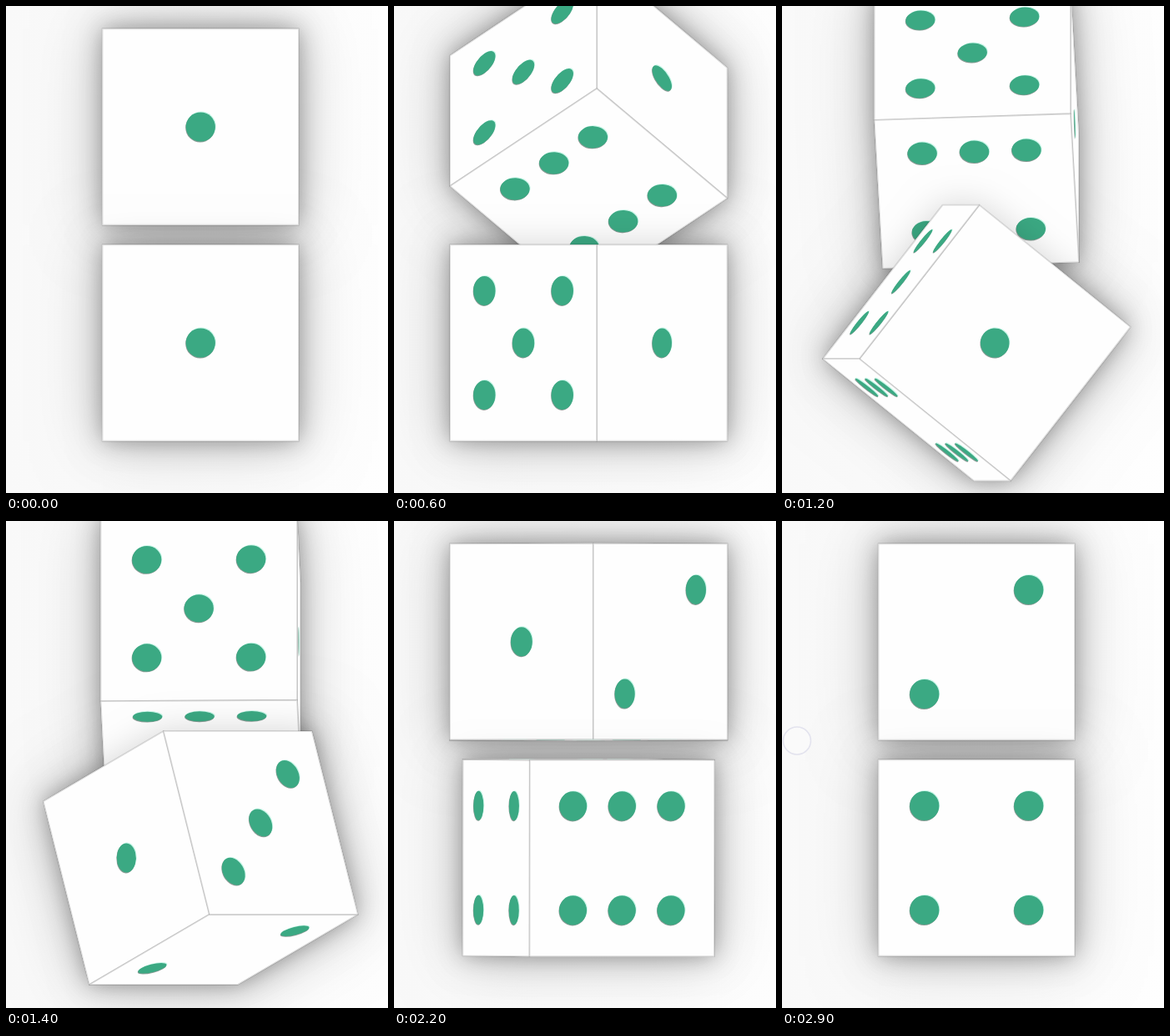
Recreate the animation shown at these times as an HTML page with a canvas. Size 458 by 584 pixels, loop 3 s.

```html
<!DOCTYPE html>
<html lang="en">
<head>
<meta charset="utf-8">
<title>Rolling dice</title>
<style>
  html, body { margin: 0; width: 100%; height: 100%; overflow: hidden; background: #fcfcfc; }
  canvas { display: block; width: 458px; height: 584px; }
</style>
</head>
<body>
<canvas id="stage" width="458" height="584"></canvas>
<script>
const ctx = document.getElementById('stage').getContext('2d');
const W = 458, H = 584, LOOP = 3000, STEP = 100;
const HALF = 117.75, PIP_GAP = 62.5, PIP_RADIUS = 17.6;
const ROLL_TIME = 960;

// A roll takes over after `cut`; its easing clock runs from `begin`.
const ROLLS = [
  { cut: 0, begin: 300 },
  { cut: 1000, begin: 952 },
  { cut: 1800, begin: 1775 }
];

// Target rotations [x, y, z] in degrees, one per roll.
const DICE = [
  { x: 233.3, y: 145, targets: [[90, 90, 0], [0, 90, 0], [0, -90, 0]] },
  { x: 233.3, y: 404, targets: [[0, 90, 0], [0, -90, 90], [0, 180, 90]] }
];

const X = [1, 0, 0], Y = [0, 1, 0], Z = [0, 0, 1];
const CENTRE = [[0, 0]];
const DIAGONAL = [[-1, -1], [1, 1]];
const CORNERS = [...DIAGONAL, [1, -1], [-1, 1]];
const neg = v => v.map(c => -c);

const FACES = [
  { n: Z, u: X, v: Y, pips: CENTRE },
  { n: X, u: Z, v: Y, pips: DIAGONAL },
  { n: neg(Y), u: X, v: Z, pips: [...DIAGONAL, ...CENTRE] },
  { n: neg(Z), u: X, v: Y, pips: CORNERS },
  { n: neg(X), u: Z, v: Y, pips: [...CORNERS, ...CENTRE] },
  { n: Y, u: X, v: Z, pips: [...CORNERS, [1, 0], [-1, 0]] }
];

const bezier = (a, b, s) => 3 * s * (1 - s) ** 2 * a + 3 * s * s * (1 - s) * b + s ** 3;

function ease(t) {
  if (t <= 0) return 0;
  if (t >= 1) return 1;
  let lo = 0, hi = 1;
  for (let i = 0; i < 24; i++) {
    const mid = (lo + hi) / 2;
    if (bezier(0.25, 0.25, mid) < t) lo = mid; else hi = mid;
  }
  return bezier(0.1, 1, lo);
}

function poseAt(targets, time) {
  let pose = [0, 0, 0];
  ROLLS.forEach(({ cut, begin }, i) => {
    if (time <= cut) return;
    const next = ROLLS[i + 1];
    const end = next ? Math.min(time, next.cut) : time;
    const k = ease((end - begin) / ROLL_TIME);
    pose = pose.map((a, axis) => a + (targets[i][axis] - a) * k);
  });
  return pose;
}

function turn(a, b, degrees) {
  const r = degrees * Math.PI / 180, c = Math.cos(r), s = Math.sin(r);
  return [a * c - b * s, a * s + b * c];
}

function rotate([x, y, z], [rx, ry, rz]) {
  [x, y] = turn(x, y, rz);
  [z, x] = turn(z, x, ry);
  [y, z] = turn(y, z, rx);
  return [x, y, z];
}

function visibleFaces(die, time) {
  const pose = poseAt(die.targets, time);
  return FACES.map(face => {
    const [n, u, v] = [face.n, face.u, face.v].map(a => rotate(a, pose));
    const at = (a, b) => [
      die.x + n[0] * HALF + u[0] * a + v[0] * b,
      die.y + n[1] * HALF + u[1] * a + v[1] * b
    ];
    const corners = [at(-HALF, -HALF), at(HALF, -HALF), at(HALF, HALF), at(-HALF, HALF)];
    return { n, u, v, at, corners, pips: face.pips };
  }).filter(face => face.n[2] > 0.001);
}

function outline(faces) {
  ctx.beginPath();
  for (const { corners } of faces) {
    corners.forEach(([x, y], i) => i ? ctx.lineTo(x, y) : ctx.moveTo(x, y));
    ctx.closePath();
  }
}

function castShadow(faces, blur, alpha) {
  ctx.save();
  ctx.shadowBlur = blur;
  ctx.shadowColor = `rgba(0,0,0,${alpha})`;
  ctx.fillStyle = '#fefefe';
  outline(faces);
  ctx.fill();
  ctx.restore();
}

function drawPip({ u, v, at }, [a, b], color, dx, dy) {
  const [x, y] = at(a * PIP_GAP, b * PIP_GAP);
  ctx.save();
  ctx.transform(u[0], u[1], v[0], v[1], x + dx, y + dy);
  ctx.beginPath();
  ctx.arc(0, 0, PIP_RADIUS, 0, Math.PI * 2);
  ctx.restore();
  ctx.fillStyle = color;
  ctx.fill();
}

function drawFace(face) {
  outline([face]);
  ctx.fillStyle = '#fefefe';
  ctx.fill();
  ctx.strokeStyle = 'rgba(0,0,0,0.13)';
  ctx.lineWidth = 1.8;
  ctx.lineJoin = 'round';
  ctx.stroke();
  for (const pip of face.pips) {
    drawPip(face, pip, '#c9f7e8', 0.9, -0.9);
    drawPip(face, pip, '#8b9b95', -0.5, 0.9);
    drawPip(face, pip, '#3ba983', 0, 0);
  }
}

function drawBackground() {
  const tint = ctx.createLinearGradient(0, 0, W, 0);
  tint.addColorStop(0, '#f9f9f9');
  tint.addColorStop(1, '#fefefe');
  ctx.fillStyle = tint;
  ctx.fillRect(0, 0, W, H);
}

function drawPointer() {
  ctx.beginPath();
  ctx.arc(18, 263.5, 16.5, 0, Math.PI * 2);
  ctx.fillStyle = '#fafafa';
  ctx.fill();
  ctx.strokeStyle = '#e3e3ee';
  ctx.lineWidth = 1.6;
  ctx.stroke();
}

function draw(time) {
  drawBackground();
  const dice = DICE.map(die => visibleFaces(die, time));
  for (const faces of dice) {
    castShadow(faces, 80, 0.2);
    castShadow(faces, 24, 0.25);
  }
  for (const faces of dice) {
    castShadow(faces, 40, 0.16);
    faces.forEach(drawFace);
  }
  if (time >= 2900) drawPointer();
}

function tick() {
  const time = performance.now() % LOOP;
  draw(Math.floor(time / STEP) * STEP);
  requestAnimationFrame(tick);
}
tick();
</script>
</body>
</html>
```
